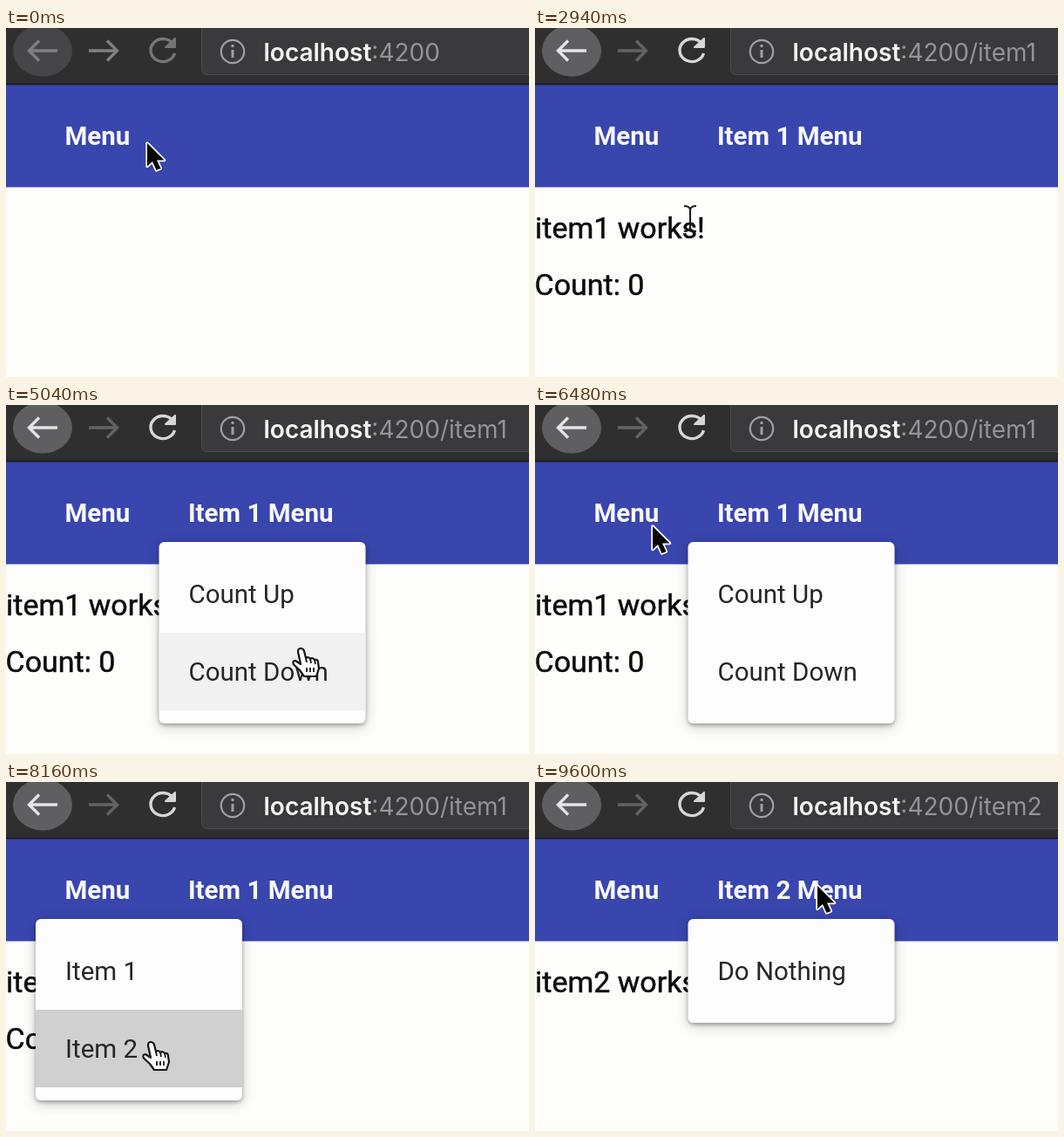
Recreate the animation shown at these times as an HTML page. Size 600 by 400 pixels, loop 9720 ms.

```html
<!DOCTYPE html>
<html lang="en">
<head>
<meta charset="utf-8">
<title>Route menus</title>
<style>
  html, body { margin: 0; width: 100%; height: 100%; overflow: hidden; background: #fdfdfc; }
  svg { display: block; width: 600px; height: 400px; }
  text { white-space: pre; }
  .ui { font: 400 29.5px Roboto, Arial, sans-serif; fill: #262626; }
  .nav { font-weight: 700; fill: #f8f8fa; }
  .body { font: 400 34px Roboto, Arial, sans-serif; fill: #0c0c0c; stroke: #0c0c0c; stroke-width: .5; }
  .url { font: 400 28px Inter, Arial, sans-serif; fill: #949496; }
  .host { font-weight: 600; fill: #f4f4f5; }
  .line { fill: none; stroke-width: 3.4; }
  .menu { filter: drop-shadow(0 2px 2px rgba(0, 0, 0, .3)) drop-shadow(0 3px 7px rgba(0, 0, 0, .2)); }
</style>
</head>
<body>
<svg viewBox="0 0 600 400">
  <rect width="600" height="400" fill="#fdfdfc"/>

  <rect width="600" height="66" fill="#2f2f30"/>
  <rect x="224.5" y="-10" width="400" height="63.5" rx="6" fill="#3a3a3d" stroke="#4c4c50"/>
  <rect y="63.5" width="600" height="2" fill="#1d1d20"/>
  <ellipse id="disc" cx="42" cy="26" rx="34" ry="29.5"/>
  <path id="back" class="line" d="M59 26H27M38 14.500L26.500 26L38 37.500"/>
  <path id="forward" class="line" d="M95 26H127M116 14.500L127.500 26L116 37.500"/>
  <g id="reload">
    <path class="line" d="M191 17.500A14 13 0 1 0 193.500 29"/>
    <path d="M194 12V22H183Z" stroke-width="2" stroke-linejoin="round"/>
  </g>
  <g stroke="#a0a0a2" fill="none">
    <circle cx="260" cy="27" r="13.2" stroke-width="2.2"/>
    <path d="M260 25V34M260 19V22" stroke-width="3"/>
  </g>
  <text class="url" x="295.500" y="38"><tspan class="host">localhost</tspan><tspan>:4200</tspan><tspan id="path"></tspan></text>

  <rect y="65.5" width="600" height="117" fill="#3946ae"/>
  <text class="ui nav" x="67.5" y="134">Menu</text>
  <text class="ui nav" id="pageMenu" x="209" y="134"></text>
  <text class="body" id="works" x="0" y="241"></text>
  <text class="body" id="count" x="-.5" y="306"></text>

  <g id="menus"></g>

  <g id="cursor">
    <path id="arrow" d="M1 1V27.500L7 22L11.500 32L16.500 30L12 20.500H20.500Z"
          fill="#050505" stroke="#fff" stroke-width="3.4" stroke-linejoin="round" paint-order="stroke"/>
    <g id="hand" fill="#fdfdfd" stroke="#151515" stroke-width="2.2" stroke-linejoin="round">
      <path d="M-4 4Q-4 0 -1 0Q2 0 3 3L5 11Q8 9 10 12Q13 10 15 13Q19 12 19 16L20 23L17 32H3L-2 25L-9 18.500Q-11 14 -7 14L-1 18Z"/>
      <path d="M5 11L6 16M10 12L11 17M15 13L16 18M6 22V27M10 22V27M14 22V27" fill="none" stroke-width="1.8"/>
    </g>
    <path id="beam" d="M-7 -14Q-1 -14 0 -10Q1 -14 7 -14M-7 15Q-1 15 0 11Q1 15 7 15M0 -10V11M-4 6H4"
          fill="none" stroke="#1c1c1c" stroke-width="2.2"/>
  </g>
</svg>
<script>
const LOOP = 9720, TICK = 60;
const TOP = 157, WIDTH = 237, ROW = 89, PAD = 15;
const FOCUS = 600, TO_ITEM1 = 2580, TO_ITEM2 = 8340;
const $ = id => document.getElementById(id);

// time, x, y, pointer shape
const moves = [
  [0, 161, 131, 'arrow'], [60, 178, 158, 'arrow'], [180, 135, 132, 'arrow'],
  [300, 103, 118, 'arrow'], [480, 103, 118, 'arrow'], [720, 127, 131, 'arrow'],
  [1500, 127, 131, 'arrow'], [1740, 148, 178, 'hand'], [2100, 166, 208, 'hand'],
  [2580, 168, 210, 'arrow'], [2700, 178, 218, 'beam'], [3060, 178, 218, 'beam'],
  [3240, 225, 170, 'arrow'], [3540, 300, 126, 'arrow'], [3960, 300, 126, 'arrow'],
  [4140, 310, 180, 'hand'], [4440, 318, 208, 'hand'], [4860, 339, 279, 'hand'],
  [5220, 339, 279, 'hand'], [5640, 300, 200, 'hand'], [5880, 270, 150, 'arrow'],
  [6300, 134, 138, 'arrow'], [6660, 134, 138, 'arrow'], [6900, 122, 127, 'arrow'],
  [7260, 122, 127, 'arrow'], [7440, 138, 180, 'hand'], [7680, 150, 210, 'hand'],
  [7980, 167, 298, 'hand'], [8340, 167, 298, 'arrow'], [8520, 220, 225, 'arrow'],
  [8820, 323, 118, 'arrow'], [9720, 323, 118, 'arrow']
];

const menus = [
  { x: 34, items: ['Item 1', 'Item 2'], open: 720, close: 2520, press: 2400 },
  { x: 175.5, items: ['Count Up', 'Count Down'], open: 3660, close: 6600 },
  { x: 34, items: ['Item 1', 'Item 2'], open: 6900, close: 8280, press: 8100 },
  { x: 175.5, items: ['Do Nothing'], open: 9000, close: LOOP }
];

function add(parent, tag, attrs, label = '') {
  const node = document.createElementNS('http://www.w3.org/2000/svg', tag);
  for (const key in attrs) node.setAttribute(key, attrs[key]);
  node.textContent = label;
  return parent.appendChild(node);
}

for (const menu of menus) {
  const { x, items } = menu;
  menu.node = add($('menus'), 'g', { class: 'menu' });
  add(menu.node, 'rect', {
    x, y: TOP, width: WIDTH, height: items.length * ROW + 2 * PAD, rx: 6, fill: '#fdfdfd'
  });
  menu.rows = items.map((label, i) => {
    const y = TOP + PAD + i * ROW;
    const row = add(menu.node, 'rect', { x, y, width: WIDTH, height: ROW });
    add(menu.node, 'text', { class: 'ui', x: x + 34, y: y + 55 }, label);
    return row;
  });
}

const clamp = v => Math.max(0, Math.min(1, v));

function pointerAt(t) {
  const i = moves.findIndex((m, k) => t >= m[0] && t < moves[k + 1][0]);
  const [t0, x0, y0, shape] = moves[i], [t1, x1, y1] = moves[i + 1];
  const p = (t - t0) / (t1 - t0), e = p * p * (3 - 2 * p);
  return { x: x0 + (x1 - x0) * e, y: y0 + (y1 - y0) * e, shape };
}

function drawMenu(menu, t, pointer) {
  const p = clamp((t - menu.open) / 120);
  const eased = 1 - (1 - p) ** 3;
  const scale = 0.8 + 0.2 * eased;
  const alpha = eased * (1 - clamp((t - menu.close) / 120));
  menu.node.style.display = alpha > 0 ? '' : 'none';
  menu.node.style.opacity = alpha;
  menu.node.setAttribute('transform',
    `translate(${menu.x} ${TOP}) scale(${scale}) translate(${-menu.x} ${-TOP})`);
  const hovered = pointer.x > menu.x && pointer.x < menu.x + WIDTH
    ? Math.floor((pointer.y - TOP - PAD) / ROW) : -1;
  const tint = t >= menu.press ? '#d0d0d0' : '#f1f1f1';
  menu.rows.forEach((row, i) => row.setAttribute('fill', i === hovered ? tint : 'none'));
}

function draw(t) {
  const active = t >= FOCUS;
  $('disc').setAttribute('fill', active ? '#5f5f61' : '#464648');
  $('back').setAttribute('stroke', active ? '#e4e4e5' : '#808082');
  $('forward').setAttribute('stroke', active ? '#636365' : '#808082');
  const reload = active ? '#d6d6d8' : '#757577';
  $('reload').setAttribute('stroke', reload);
  $('reload').setAttribute('fill', reload);

  const page = t >= TO_ITEM2 ? 2 : t >= TO_ITEM1 ? 1 : 0;
  $('path').textContent = page ? `/item${page}` : '';
  $('pageMenu').textContent = page ? `Item ${page} Menu` : '';
  $('works').textContent = page ? `item${page} works!` : '';
  $('count').textContent = page === 1 ? 'Count: 0' : '';

  const pointer = pointerAt(t);
  menus.forEach(menu => drawMenu(menu, t, pointer));
  for (const shape of ['arrow', 'hand', 'beam'])
    $(shape).style.display = shape === pointer.shape ? '' : 'none';
  $('cursor').setAttribute('transform', `translate(${pointer.x} ${pointer.y})`);
}

const start = performance.now();
function tick() {
  const t = (performance.now() - start) % LOOP;
  draw(Math.floor(t / TICK) * TICK);
  requestAnimationFrame(tick);
}
tick();
</script>
</body>
</html>
```
